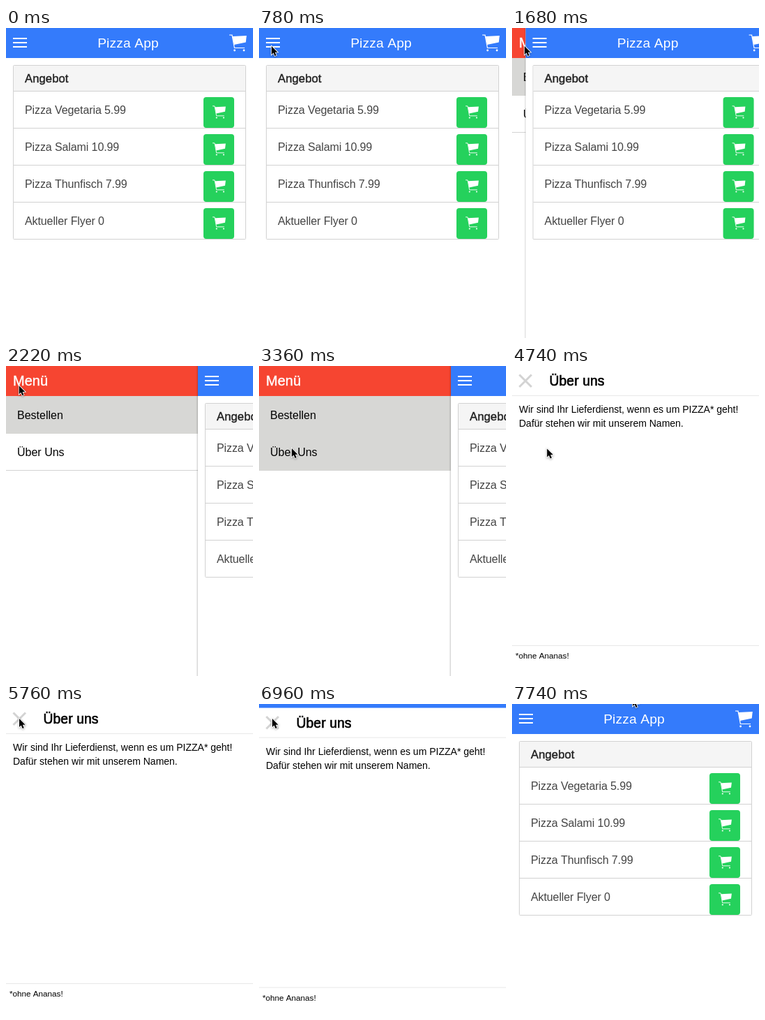
Write an HTML page with a canvas that moves like this. It is 354x444 px and loops after 7860 ms.

```html
<!DOCTYPE html>
<html lang="de">
<head>
<meta charset="utf-8">
<title>Pizza App</title>
<style>
  html, body { margin: 0; width: 100%; height: 100%; overflow: hidden; background: #fff; }
  canvas { display: block; width: 354px; height: 444px; }
</style>
</head>
<body>
<canvas id="stage"></canvas>
<script>
const W = 354, H = 444, LOOP = 7860, STEP = 60, MENU = 275;
const BLUE = '#347bfb', RED = '#f64531', GREEN = '#25d15c';

const canvas = document.getElementById('stage');
const ctx = canvas.getContext('2d');
const dpr = window.devicePixelRatio || 1;
canvas.width = W * dpr;
canvas.height = H * dpr;

// CSS-style cubic-bezier easing
function bezier(x1, y1, x2, y2) {
  const at = (a, b, s) => 3 * a * s * (1 - s) ** 2 + 3 * b * s * s * (1 - s) + s ** 3;
  return p => {
    if (p <= 0) return 0;
    if (p >= 1) return 1;
    let lo = 0, hi = 1;
    for (let i = 0; i < 24; i++) {
      const mid = (lo + hi) / 2;
      if (at(x1, x2, mid) < p) lo = mid; else hi = mid;
    }
    return at(y1, y2, lo);
  };
}
const ease = bezier(.25, .1, .25, 1);
const easeInOut = bezier(.42, 0, .58, 1);
const slideUp = bezier(.1, .7, .1, 1);

// Pointer moves: start, end, from x, y, to x, y
const MOVES = [
  [300, 780, 90, 3, 17, 25],
  [2160, 2700, 17, 25, 46, 117],
  [4680, 4860, 46, 117, 60, 119],
  [4980, 5760, 60, 119, 18, 20],
  [7200, 7740, 18, 20, 172, -10]
];

const ITEMS = ['Pizza Vegetaria 5.99', 'Pizza Salami 10.99', 'Pizza Thunfisch 7.99', 'Aktueller Flyer 0'];

function rect(x, y, w, h, color) {
  ctx.fillStyle = color;
  ctx.fillRect(x, y, w, h);
}

function text(str, x, y, size, color, { weight = 0, align = 'left', spacing = 0 } = {}) {
  ctx.font = `${size}px "Liberation Sans", Arial, sans-serif`;
  ctx.textAlign = align;
  ctx.letterSpacing = spacing + 'px';
  ctx.fillStyle = color;
  ctx.fillText(str, x, y);
  if (weight) {
    ctx.strokeStyle = color;
    ctx.lineWidth = weight;
    ctx.strokeText(str, x, y);
  }
}

function poly(points) {
  ctx.beginPath();
  points.forEach(([x, y]) => ctx.lineTo(x, y));
}

function cart(x, y, size) {
  ctx.save();
  ctx.translate(x, y);
  ctx.scale(size / 25, size / 25);
  ctx.fillStyle = ctx.strokeStyle = '#fff';
  ctx.lineWidth = 1.2;
  poly([[0, 1], [4, 1.2], [7.4, 19.5], [22, 19.5]]);
  ctx.stroke();
  poly([[4.6, 3], [24.8, 2], [23.7, 11.5], [6.8, 15]]);
  ctx.fill();
  for (const cx of [7.6, 21]) {
    ctx.beginPath();
    ctx.arc(cx, 23, 1.4, 0, 7);
    ctx.fill();
  }
  ctx.restore();
}

function drawMenu(picked) {
  rect(0, 0, MENU, 43, RED);
  text('Menü', 10, 28, 20, '#fff', { weight: .4 });
  rect(0, 43, MENU, 54, '#d7d7d5');
  if (picked) rect(0, 97, MENU, 53, '#d7d7d5');
  else rect(0, 149, MENU, 1, '#d3d3d3');
  text('Bestellen', 16, 76, 16, '#000');
  text('Über Uns', 16, 129, 16, '#000');
}

function drawPage(x) {
  ctx.save();
  ctx.translate(x, 0);
  if (x > 0) {
    ctx.shadowColor = 'rgba(0,0,0,.22)';
    ctx.shadowBlur = 2 * dpr;
    ctx.shadowOffsetX = -dpr;
  }
  rect(0, -9, W, H + 18, '#fff');
  ctx.shadowColor = 'transparent';

  rect(0, 0, W, 43, BLUE);
  for (const y of [14, 20, 26]) rect(10, y, 20, 2, '#fff');
  text('Pizza App', 175, 28, 19.2, '#fff', { align: 'center', spacing: .15 });
  cart(320, 9, 25);

  ctx.beginPath();
  ctx.roundRect(10.5, 53.5, 333, 249, 1);
  ctx.strokeStyle = '#d2d2d2';
  ctx.lineWidth = 1;
  ctx.stroke();
  rect(11, 54, 332, 36, '#f5f5f5');
  text('Angebot', 27, 78, 16.6, '#222', { weight: .45, spacing: .1 });
  ITEMS.forEach((label, i) => {
    const y = 90 + i * 53;
    rect(11, y, 332, 1, '#d2d2d2');
    text(label, 27, y + 33, 16, '#444', { spacing: -.1 });
    ctx.beginPath();
    ctx.roundRect(283, y + 9, 44, 44, 4);
    ctx.fillStyle = GREEN;
    ctx.fill();
    cart(296, y + 21, 19);
  });
  ctx.restore();
}

function drawModal(y) {
  ctx.save();
  ctx.translate(0, y);
  rect(0, 0, W, H, '#fff');
  ctx.strokeStyle = '#d3d3d3';
  ctx.lineWidth = 3;
  ctx.beginPath();
  ctx.moveTo(10.5, 12.5);
  ctx.lineTo(28, 30);
  ctx.moveTo(28, 12.5);
  ctx.lineTo(10.5, 30);
  ctx.stroke();
  text('Über uns', 53.5, 28, 19.3, '#000', { weight: .6, spacing: .1 });
  rect(0, 42, W, 1, '#e8e8e8');
  text('Wir sind Ihr Lieferdienst, wenn es um PIZZA* geht!', 10, 67, 14, '#000');
  text('Dafür stehen wir mit unserem Namen.', 10, 87, 14, '#000');
  rect(0, 400, W, 1, '#e8e8e8');
  text('*ohne Ananas!', 5, 419, 11.7, '#000');
  ctx.restore();
}

function drawPointer(t) {
  const move = MOVES.filter(m => t >= m[0]).pop();
  if (!move) return;
  const [t0, t1, x0, y0, x1, y1] = move;
  const k = easeInOut((t - t0) / (t1 - t0));
  ctx.save();
  ctx.translate(x0 + (x1 - x0) * k + 1, y0 + (y1 - y0) * k + 1);
  ctx.scale(.9, .9);
  poly([[0, 0], [0, 13.4], [3, 10.6], [5.2, 15.6], [7.5, 14.6], [5.4, 9.8], [9.6, 9.6]]);
  ctx.closePath();
  ctx.save();
  ctx.shadowColor = 'rgba(0,0,0,.35)';
  ctx.shadowBlur = 3 * dpr;
  ctx.shadowOffsetY = dpr;
  ctx.strokeStyle = '#fff';
  ctx.lineWidth = 1.8;
  ctx.stroke();
  ctx.restore();
  ctx.fillStyle = '#000';
  ctx.fill();
  ctx.restore();
}

function draw(t) {
  const open = ease((t - 1661.6) / 220) - ease((t - 3458) / 220);
  const shown = slideUp((t - 3492) / 400) - easeInOut((t - 6940) / 250);
  ctx.setTransform(dpr, 0, 0, dpr, 0, 0);
  rect(0, 0, W, H, '#fff');
  if (open > 0) drawMenu(t >= 3360);
  drawPage(MENU * open);
  if (shown > 0) drawModal(H * (1 - shown));
  drawPointer(t);
}

// The screen refreshes in 60 ms steps
const start = performance.now();
function tick() {
  const t = (performance.now() - start) % LOOP;
  draw(Math.floor(t / STEP) * STEP);
  requestAnimationFrame(tick);
}
tick();
</script>
</body>
</html>
```
